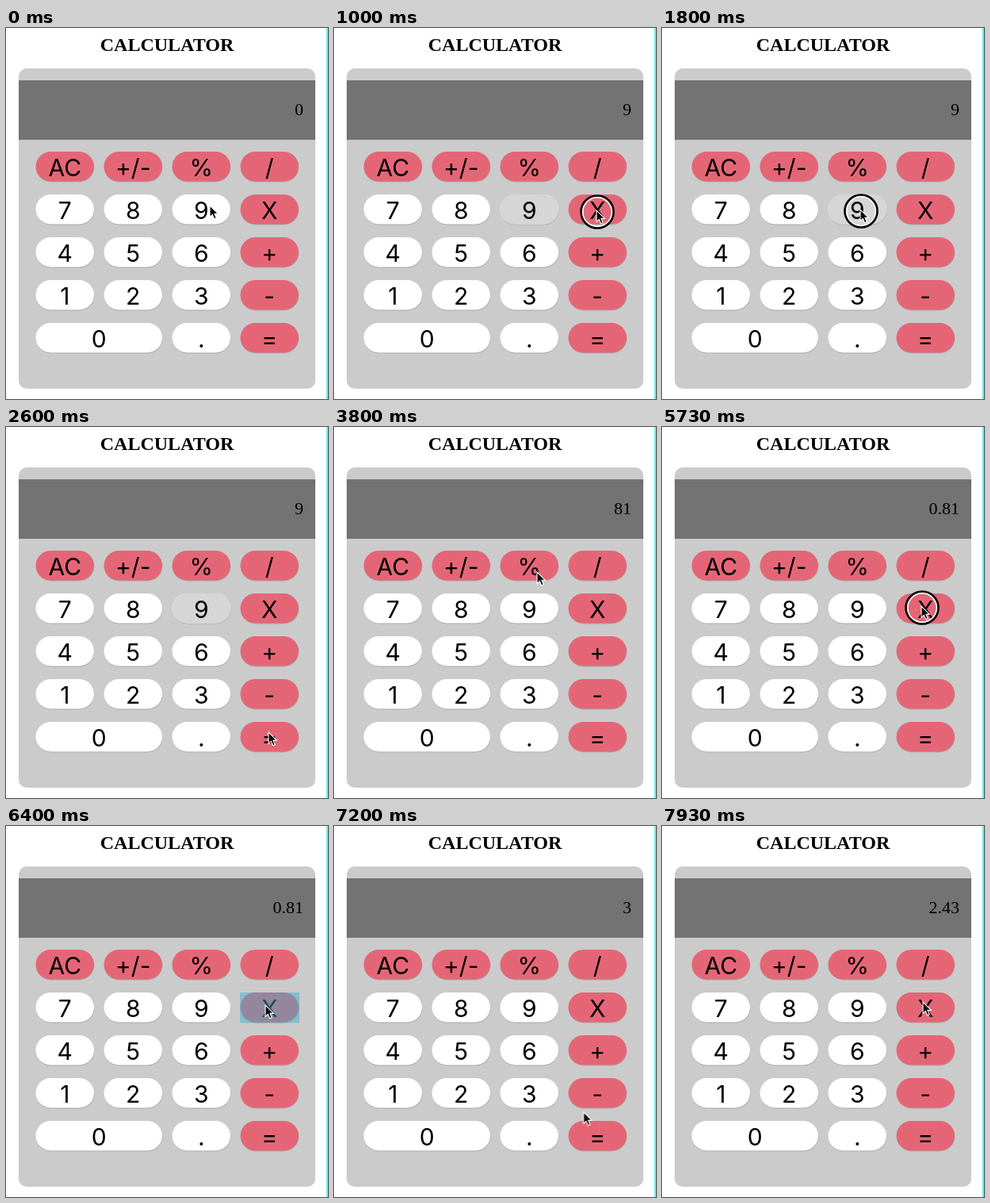
Write an HTML page that moves like this. It is 406 px wide and 468 px high and loops after 8 s.

```html
<!DOCTYPE html>
<html lang="en">
<head>
<meta charset="utf-8">
<title>Calculator</title>
<style>
html, body { margin: 0; width: 100%; height: 100%; overflow: hidden; background: #fff; }
svg { display: block; width: 100%; height: 100%; }
.title { font: bold 24px "Liberation Serif", serif; text-anchor: middle; }
.value { font: 22px "Liberation Serif", serif; text-anchor: end; opacity: 0; }
.key text { font: 30px Inter, sans-serif; text-anchor: middle; }
.shade { fill: #aaa; }
.num { fill: #fff; }
.op { fill: #e46676; }
.ring circle { fill: none; }

.value, .focus, .selection, .ring { animation: 8s step-end infinite; }
.cursor { animation: move 8s ease-in-out infinite; }
.ring { animation-name: click; }
.selection { animation-name: select; }
.focus { animation-name: nine; }
.zero { animation-name: zero; }
.nine { animation-name: nine; }
.product { animation-name: product; }
.percent { animation-name: percent; }
.three { animation-name: three; }
.result { animation-name: result; }

@keyframes zero { 0% { opacity: 1 } 1.6%, 100% { opacity: 0 } }
@keyframes nine { 0%, 34.2%, 100% { opacity: 0 } 1.6% { opacity: 1 } }
@keyframes product { 0%, 53.4%, 100% { opacity: 0 } 34.2% { opacity: 1 } }
@keyframes percent { 0%, 85%, 100% { opacity: 0 } 53.4% { opacity: 1 } }
@keyframes three { 0%, 92.4%, 100% { opacity: 0 } 85% { opacity: 1 } }
@keyframes result { 0% { opacity: 0 } 92.4%, 100% { opacity: 1 } }
@keyframes select { 0%, 85%, 100% { opacity: 0 } 73.2% { opacity: 1 } }
@keyframes click {
  0%, 4.2%, 14.1%, 23.4%, 36.8%, 55%, 71.8%, 75.4%, 87.2%, 94.6%, 100% { opacity: 0 }
  1.6%, 11.6%, 20.9%, 34.2%, 52.5%, 70%, 73.2%, 85%, 92.4% { opacity: 1 }
}
@keyframes move {
  0%, 6.25% { transform: translate(257px, 224px) }
  10.9%, 15.6% { transform: translate(331px, 230px) }
  20%, 25.6% { transform: translate(250px, 229px) }
  32.5% { transform: translate(331px, 385px) }
  33.75%, 41.2% { transform: translate(331px, 391px) }
  43.4% { transform: translate(300px, 282px) }
  46.6%, 56.9% { transform: translate(256px, 183px) }
  60.9% { transform: translate(318px, 212px) }
  62.5% { transform: translate(316px, 208px) }
  65.9%, 80.6% { transform: translate(327px, 226px) }
  84.4%, 87.5% { transform: translate(245px, 336px) }
  90.9% { transform: translate(326px, 365px) }
  92.2%, 95% { transform: translate(331px, 391px) }
  99.1%, 100% { transform: translate(329px, 222px) }
}
</style>
</head>
<body>
<svg viewBox="0 0 406 468">
  <rect x="404" width="2" height="468" fill="#45f3fb"/>
  <text class="title" x="203" y="29">CALCULATOR</text>
  <rect x="16" y="51" width="374" height="404" rx="10" fill="#cbcbcb"/>
  <rect x="16" y="66" width="374" height="75" fill="#737373"/>
  <text class="value zero" x="375" y="110">0</text>
  <text class="value nine" x="375" y="110">9</text>
  <text class="value product" x="375" y="110">81</text>
  <text class="value percent" x="375" y="110">0.81</text>
  <text class="value three" x="375" y="110">3</text>
  <text class="value result" x="375" y="110">2.43</text>
  <g id="keys"></g>
  <rect class="selection" x="295" y="210" width="75" height="38.5" fill="rgb(51 173 207 / .45)"/>
  <g class="cursor">
    <g class="ring">
      <circle cx="1" cy="2" r="18.5" stroke="#fff" stroke-width="2"/>
      <circle cx="1" cy="2" r="20.5" stroke="#000" stroke-width="2.6"/>
    </g>
    <path d="M0 0V14.5L3.3 11.4L5.6 16.8L8.2 15.7L5.9 10.4H10.4Z" stroke="#fff" stroke-width="1.1"/>
  </g>
</svg>
<script>
const rows = ["AC +/- % /", "7 8 9 X", "4 5 6 +", "1 2 3 -", "0 . ="];
const pill = (cls, x, y, w) =>
  `<rect class="${cls}" x="${x}" y="${y}" width="${w}" height="37.5" rx="18.75"/>`;

function key(label, x, y, w) {
  const kind = /^[\d.]$/.test(label) ? "num" : "op";
  const focus = label === "9" ? `<g class="focus" fill="#d6d6d6">${pill("", x, y, w)}</g>` : "";
  return `<g class="key">${pill("shade", x + .3, y + 1, w)}${pill(kind, x, y, w)}${focus}
    <text x="${x + w / 2}" y="${y + 31}">${label}</text></g>`;
}

document.getElementById("keys").innerHTML = rows.map((row, r) => {
  let x = 37.5;
  return row.split(" ").map(label => {
    const w = label === "0" ? 159.5 : 73.5;
    const html = key(label, x, 156 + r * 54, w);
    x += w + 12.5;
    return html;
  }).join("");
}).join("");
</script>
</body>
</html>
```
